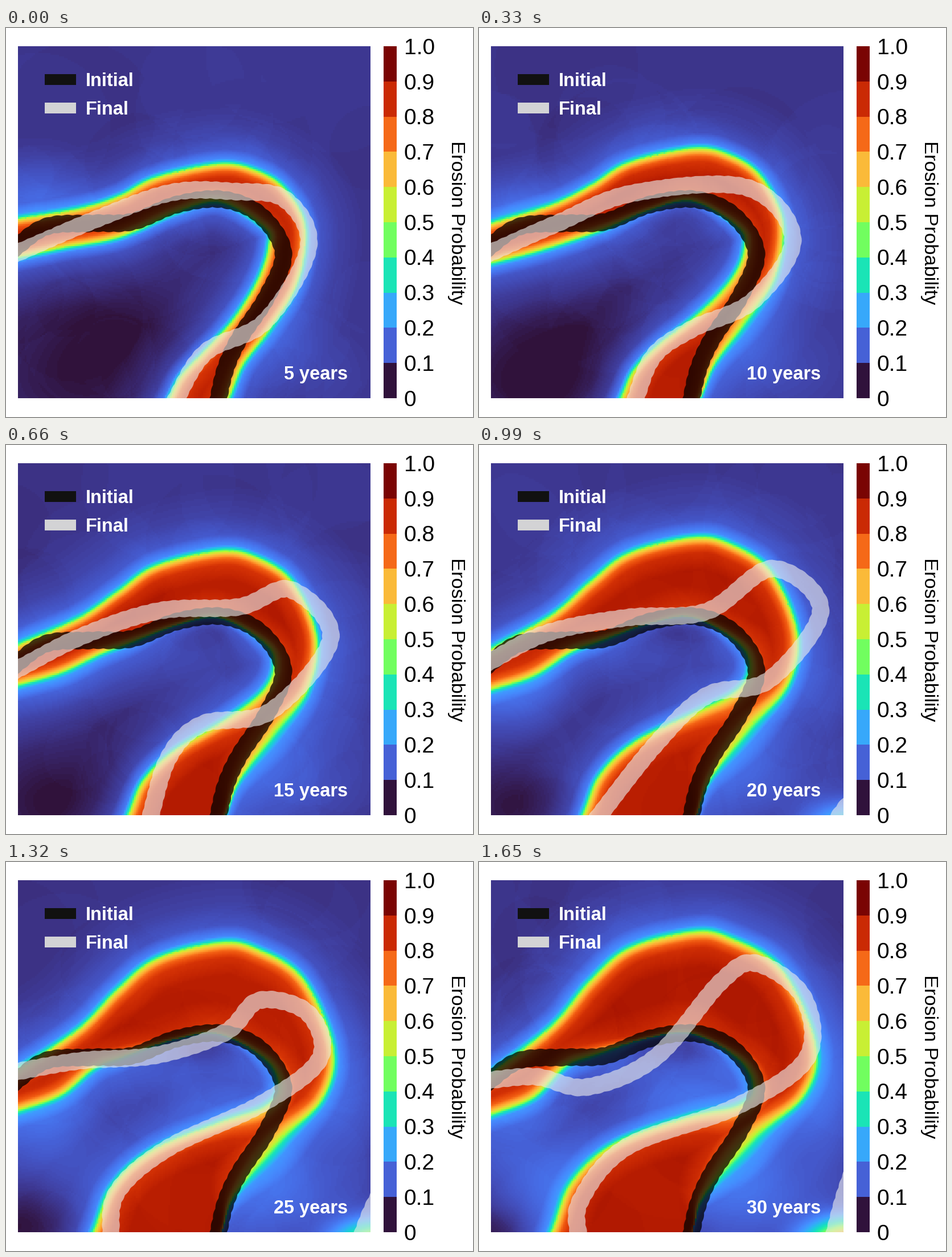
Animation of 820 by 683 pixels, one loop 1.98 s. Source, as a matplotlib script:

```python
import matplotlib.pyplot as plt
import numpy as np
from matplotlib.animation import FuncAnimation
from matplotlib.patches import Polygon, Rectangle
from matplotlib.path import Path

W, H, DPI = 820, 683, 64
LEFT, TOP, RIGHT, BOTTOM = 21, 32, 640, 650
CELLS = 206
STEPS = 6
PT = 72 / DPI  # points per pixel
FONT = "Liberation Sans"
TURBO = plt.get_cmap("turbo")

X, Y = np.meshgrid(np.linspace(LEFT + 1.5, RIGHT - 1.5, CELLS),
                   np.linspace(TOP + 1.5, BOTTOM - 1.5, CELLS))

# Probability against distance from the 0.5 contour (positive inside)
REACH = [-120, -65, -30, -11, -4.5, 0, 5, 13, 25, 55]
LEVEL = [0, .02, .05, .13, .28, .5, .64, .78, .87, .92]

# Both banks of the flooded belt, in the first and the last step
OUTER = ([(21, 336), (130, 318), (200, 296), (265, 263), (375, 240), (440, 252),
          (490, 285), (524, 350), (511, 445), (462, 528), (415, 590), (390, 650)],
         [(21, 372), (130, 288), (195, 212), (265, 153), (375, 124), (440, 135),
          (530, 190), (589, 320), (568, 410), (480, 483), (395, 583), (374, 650)])
INNER = ([(21, 402), (100, 385), (180, 371), (230, 354), (300, 322), (375, 304),
          (455, 350), (462, 385), (443, 443), (400, 512), (345, 572), (308, 612), (288, 650)],
         [(21, 442), (95, 412), (150, 358), (200, 338), (300, 308), (375, 301),
          (460, 348), (484, 400), (455, 431), (370, 449), (240, 495), (165, 562), (129, 650)])

INITIAL = [(8, 392), (70, 349), (150, 343), (222, 340), (300, 310), (380, 301),
           (447, 329), (487, 395), (458, 472), (410, 545), (385, 600), (370, 665)]
FINAL = [
    [(8, 400), (160, 335), (290, 289), (400, 287), (490, 301), (531, 385),
     (455, 515), (350, 570), (291, 665)],
    [(8, 400), (135, 344), (270, 290), (470, 280), (551, 370), (482, 478),
     (375, 528), (306, 577), (270, 665)],
    [(8, 400), (135, 335), (270, 291), (410, 284), (500, 254), (570, 340),
     (465, 467), (345, 490), (285, 550), (250, 665)],
    [(8, 386), (120, 330), (260, 303), (400, 292), (515, 217), (600, 290),
     (510, 412), (400, 440), (308, 528), (200, 665)],
    [(8, 370), (130, 349), (265, 339), (385, 299), (445, 243), (530, 265),
     (551, 345), (450, 424), (285, 502), (195, 580), (183, 665)],
    [(8, 384), (100, 377), (190, 395), (310, 343), (425, 210), (487, 178),
     (570, 238), (575, 345), (450, 430), (260, 500), (178, 595), (175, 665)]]


def curve(pts, n=30):
    """Catmull-Rom spline through the points."""
    p = np.array(pts, float)
    p = np.vstack([2 * p[0] - p[1], p, 2 * p[-1] - p[-2]])
    t = np.linspace(0, 1, n, endpoint=False)[:, None]
    parts = [0.5 * (2 * b + (c - a) * t + (2 * a - 5 * b + 4 * c - d) * t**2
                    + (3 * b - a - 3 * c + d) * t**3)
             for a, b, c, d in zip(p, p[1:], p[2:], p[3:])]
    return np.vstack(parts + [p[-2:-1]])


def bank(poses, ease):
    """Spline between two poses, prolonged beyond both ends."""
    a, b = np.array(poses, float)
    p = a + (b - a) * ease
    return curve(np.vstack([2 * p[0] - p[1], p, 3 * p[-1] - 2 * p[-2]]))


def ribbon(pts):
    """Channel outline with slightly scalloped edges."""
    c = curve(pts)
    d = np.gradient(c, axis=0)
    size = np.hypot(d[:, 0], d[:, 1])
    normal = np.column_stack([-d[:, 1], d[:, 0]]) / size[:, None]
    r = 14.2 + 1.5 * np.abs(np.sin(np.pi * np.cumsum(size) / 18))[:, None]
    return np.vstack([c + normal * r, (c - normal * r)[::-1]])


def bump(x, y, rx, ry):
    return np.exp(-(((X - x) / rx)**2 + ((Y - y) / ry)**2) / 2)


def field(step):
    u = step / (STEPS - 1)
    slow = 1.23 * u - 0.23 * u * u

    def mix(a, b):
        return a + (b - a) * u

    a = bank(OUTER, (u**1.3, slow))
    b = bank(INNER, slow)
    dist2 = np.full(X.shape, 1e9)
    for x, y in np.vstack([a, b]):
        np.minimum(dist2, (X - x)**2 + (Y - y)**2, out=dist2)
    belt = Path(np.vstack([a, b[::-1]]))
    inside = belt.contains_points(np.column_stack([X.ravel(), Y.ravel()]))
    dist = np.sqrt(dist2) * np.where(inside.reshape(X.shape), 1, -1)

    # Soft edge at the lower right, hard edges along the initial channel
    scale = 0.9 + 0.2 * u + 1.2 * u**0.6 * bump(475, 510, 50, 50)
    hard = np.clip(bump(335, 322, 90, 32) + bump(375, 640, 35, 50), 0, 1)
    scale *= 1 - 0.88 * u**0.3 * hard
    core = np.interp(dist / scale, REACH, LEVEL)

    back = (0.048
            - 0.05 * bump(mix(140, 25), mix(610, 650), mix(120, 50), mix(85, 30))
            - mix(0.025, 0) * bump(220, 510, 90, 50)
            + mix(0.03, 0.05) * bump(mix(50, 90), mix(280, 530), 60, mix(40, 70))
            + mix(-0.02, 0.05) * bump(350, 385, 80, 42)
            + mix(0, 0.045) * bump(610, 420, 45, 110)
            + mix(0.025, 0.06) * bump(500, 600, 85, 55)
            + max(0, 1.5 * u - 0.6) * bump(658, 673, 50, 28))

    rng = np.random.default_rng(step + 3)
    haze = np.zeros(X.shape)
    for _ in range(36):
        x, y, r = rng.uniform(0, 660), rng.uniform(20, 660), rng.uniform(40, 150)
        haze += rng.choice([-1, 1]) * 0.003 * ((X - x)**2 + (Y - y)**2 < r * r)
    return np.clip(core + back * (1 - core) + haze, 0, 1)


def cutoff(step):
    """Neighbouring bend that enters at the lower right corner."""
    k = step - 3
    return ribbon([(675, 605 - 55 * k), (643, 638 - 28 * k), (618, 675)])


fields = [field(i) for i in range(STEPS)]

fig = plt.figure(figsize=(W / DPI, H / DPI), dpi=DPI, facecolor="white")
ax = fig.add_axes([0, 0, 1, 1])
ax.axis("off")

image = ax.imshow(fields[0], cmap=TURBO, vmin=0, vmax=1, aspect="auto",
                  interpolation="nearest", extent=(LEFT, RIGHT, BOTTOM, TOP))
ax.set(xlim=(0, W), ylim=(H, 0))
frame = Rectangle((LEFT, TOP), RIGHT - LEFT, BOTTOM - TOP, transform=ax.transData)


def channel(outline, color, alpha):
    patch = ax.add_patch(Polygon(outline, fc=color, ec="none", alpha=alpha))
    patch.set_clip_path(frame)
    return patch


def label(x, y, text, size, **style):
    return ax.text(x, y, text, fontsize=size * PT, family=FONT, **style)


channel(ribbon(INITIAL), "black", 0.74)
river = channel(ribbon(FINAL[0]), "#ebebeb", 0.62)
corner = channel(cutoff(0), "#ebebeb", 0.62)

bold = dict(size=32.5, color="white", weight="bold")
for y, color, name in [(81, "#111111", "Initial"), (131, "#d3d3d5", "Final")]:
    ax.add_patch(Rectangle((68, y), 54.5, 18.5, fc=color, ec="none"))
    label(139.5, y + 21, name, **bold)
years = label(600, 617.5, "", ha="right", **bold)

band = (BOTTOM - TOP) / 10
for i in range(11):
    y = BOTTOM - i * band
    if i < 10:
        ax.add_patch(Rectangle((663, y - band), 23, band, fc=TURBO(i / 9),
                               ec="none", antialiased=False))
    label(699, y + 13.7, f"{i / 10:.1f}" if i else "0", 39, color="black")
label(782, 198, "Erosion Probability", 34.4, color="black", rotation=-90,
      rotation_mode="anchor", ha="left", va="baseline")


def update(i):
    image.set_data(fields[i])
    river.set_xy(ribbon(FINAL[i]))
    corner.set_xy(cutoff(i))
    years.set_text(f"{5 * (i + 1)} years")
    return image, river, corner, years


anim = FuncAnimation(fig, update, frames=STEPS, interval=330,
                     repeat=True, repeat_delay=0, blit=False)
plt.show()
```
